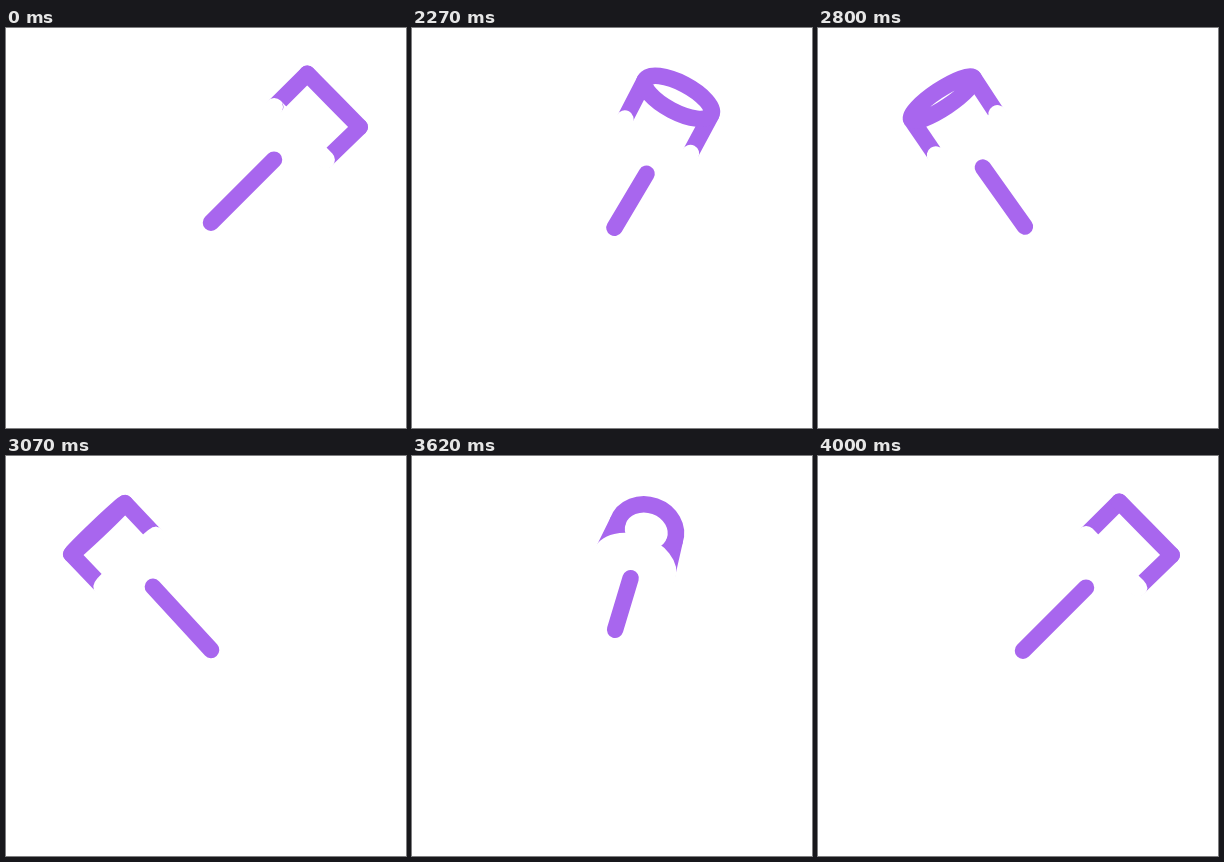
Recreate the animation shown at these times as an HTML page with a canvas. Size 400 by 400 pixels, loop 4.02 s.

```html
<!DOCTYPE html>
<html lang="en">
<head>
<meta charset="utf-8">
<title>Spinning glass</title>
<style>
  html, body { margin: 0; width: 100%; height: 100%; overflow: hidden; background: #fff; }
  canvas { display: block; width: 400px; height: 400px; }
</style>
</head>
<body>
<canvas id="stage" width="400" height="400"></canvas>
<script>
const ctx = document.getElementById('stage').getContext('2d');
const LOOP = 4020, HOLD = 2020, SPIN_START = 2000, SPIN = 2000;
const PURPLE = '#a866ee', WHITE = '#fff', STROKE = 16.5;
const TAU = Math.PI * 2;

// Glass parts for a turn angle:
// swing is the sideways reach, 1 right to -1 left;
// face is 1 with the mouth towards the viewer, -1 with it turned away.
function pose(angle) {
  const swing = 0.887 * Math.cos(angle) + 0.113 * Math.cos(3 * angle);
  const sin = Math.sin(angle);
  const face = sin * Math.abs(sin);
  const depth = face * face;
  const away = Math.max(0, -face);
  const bend = (rest, slope, curve) => rest + slope * face + curve * depth;
  const reach = (mid, far, pull, drift) =>
    mid + swing * (far - pull * depth) + drift * depth;

  return {
    face,
    rim: {
      x: reach(207, 120.5, 0, 0), y: bend(72.4, -4.5, -1.6),
      rx: 37.4 - 8.5 * away, ry: bend(0, 27.5, -3.6)
    },
    bowl: {
      x: reach(206.5, 87.5, 25, 0), y: bend(105.3, 1.5, 7.5),
      rx: 37 - 3 * away, ry: 25.5 * face
    },
    top: { x: reach(206, 62, 15, 1.5), y: bend(131.7, 19.5, 9.8) },
    foot: { x: reach(205, 0, 20, 2), y: bend(194.7, 15, -10.8) }
  };
}

function line(a, b) {
  ctx.beginPath();
  ctx.moveTo(a.x, a.y);
  ctx.lineTo(b.x, b.y);
  ctx.stroke();
}

function oval(o, tilt, end) {
  ctx.beginPath();
  ctx.ellipse(o.x, o.y, o.rx, Math.max(Math.abs(o.ry), 0.01), tilt, 0, end);
}

function pen(color, width) {
  ctx.strokeStyle = color;
  ctx.lineWidth = width;
}

function draw(angle) {
  const { face, rim, bowl, top, foot } = pose(angle);
  const tilt = Math.atan2(rim.x - bowl.x, bowl.y - rim.y);
  const edge = (o, side) => ({
    x: o.x + side * o.rx * Math.cos(tilt),
    y: o.y + side * o.rx * Math.sin(tilt)
  });
  const drawRim = () => {
    pen(PURPLE, STROKE);
    oval(rim, tilt, TAU);
    ctx.stroke();
  };
  const drawBowl = () => {
    pen(WHITE, STROKE + 1.5);
    oval(bowl, tilt, face >= 0 ? Math.PI : TAU);
    ctx.fill();
    ctx.stroke();
  };

  ctx.fillStyle = WHITE;
  ctx.fillRect(0, 0, 400, 400);
  ctx.lineCap = ctx.lineJoin = 'round';

  pen(PURPLE, STROKE);
  for (const side of [-1, 1]) line(edge(rim, side), edge(bowl, side));

  // The nearer end of the cup goes on top
  const layers = [drawBowl, drawRim];
  if (face < 0) layers.reverse();
  layers.forEach(paint => paint());

  pen(PURPLE, STROKE);
  line(top, foot);
}

function frame() {
  const t = performance.now() % LOOP;
  const turn = t < HOLD ? 0 : Math.min(1, (t - SPIN_START) / SPIN);
  draw(turn * TAU);
  requestAnimationFrame(frame);
}
frame();
</script>
</body>
</html>
```
